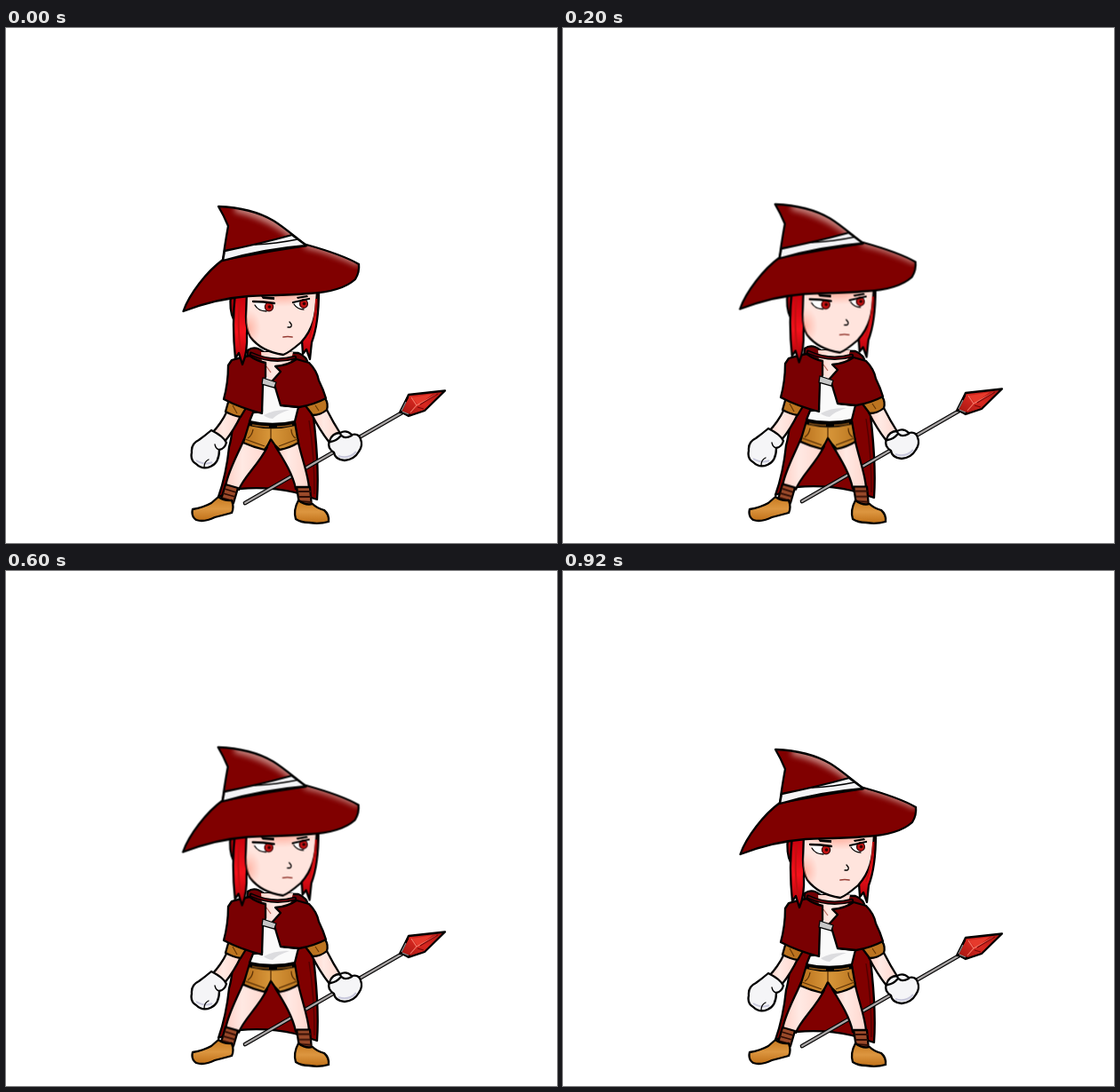
Recreate the animation shown at these times as an HTML page. Size 620x580 px, loop 1000 ms.

```html
<!DOCTYPE html>
<html lang="en">
<head>
<meta charset="utf-8">
<title>Red mage idle</title>
<style>
  html, body { margin: 0; width: 100%; height: 100%; overflow: hidden; background: #fff; }
  svg { display: block; width: 620px; height: 580px; }
  .ink { stroke: #000; stroke-width: 2.3; stroke-linejoin: round; stroke-linecap: round; }
  .line { fill: none; }
  .thin { stroke-width: 1.3; }
  .wide { stroke-width: 4.6; }
  .body, .legs, .head { animation: 1s step-end infinite; }
  .body { animation-name: breathe; }
  .legs { animation-name: stretch; transform-origin: 295px 542px; }
  .head { animation-name: nod; }
  @keyframes breathe {
    0%, 80% { transform: translateY(0); }
    20%, 60% { transform: translateY(-2px); }
    40% { transform: translateY(-4px); }
  }
  @keyframes stretch {
    0%, 80% { transform: scaleY(1); }
    20%, 60% { transform: scaleY(1.016); }
    40% { transform: scaleY(1.032); }
  }
  @keyframes nod {
    0%, 40%, 80% { transform: translateY(0); }
    20%, 60% { transform: translate(-.4px, -2.5px); }
  }
</style>
</head>
<body>
<svg viewBox="0 0 620 580" role="img" aria-label="Mage in a red hat holding a gem staff">
  <defs>
    <linearGradient id="skin" x1="0" x2="1">
      <stop offset="0" stop-color="#ffd0c6"/>
      <stop offset=".4" stop-color="#ffe9e3"/>
      <stop offset="1" stop-color="#ffd6cd"/>
    </linearGradient>
    <linearGradient id="hair" x1="0" y1="0" x2="0" y2="1">
      <stop offset="0" stop-color="#c4000c"/>
      <stop offset=".55" stop-color="#f5121c"/>
      <stop offset="1" stop-color="#a80008"/>
    </linearGradient>
    <linearGradient id="cloth" x1="0" x2="1">
      <stop offset="0" stop-color="#b8701c"/>
      <stop offset=".5" stop-color="#d8973a"/>
      <stop offset="1" stop-color="#bc7822"/>
    </linearGradient>
    <linearGradient id="shoe" x1="0" y1="0" x2="0" y2="1">
      <stop offset="0" stop-color="#c87a20"/>
      <stop offset=".5" stop-color="#dc9640"/>
      <stop offset="1" stop-color="#c07018"/>
    </linearGradient>
    <linearGradient id="gem" x1="0" y1="1" x2="1" y2="0">
      <stop offset="0" stop-color="#a01410"/>
      <stop offset=".5" stop-color="#d82820"/>
      <stop offset="1" stop-color="#a81410"/>
    </linearGradient>
    <radialGradient id="blush">
      <stop offset="0" stop-color="#ff8f78" stop-opacity=".75"/>
      <stop offset="1" stop-color="#ff9f8c" stop-opacity="0"/>
    </radialGradient>
    <filter id="soft" x="-30%" y="-30%" width="160%" height="160%"><feGaussianBlur stdDeviation="3"/></filter>
    <path id="crown" d="M239 201 C265 202 284 207 301 217 C314 225 326 236 338 245 L300 251 L244 261 L246 247 Q248 234 250 223 Q245 211 239 201Z"/>
    <path id="brim" d="M244 261 C268 256 300 247 338 244 C356 249 380 256 397 266 Q398 275 393 283 C381 294 362 298 340 299 C318 301 294 301 273 302 C246 304 220 311 199.5 319 C206 300 226 274 244 261Z"/>
    <path id="face" d="M271 296 L270 325 Q270 339 275 348 C284 360 298 366 312 368 Q318 366 332 354 C345 340 349 325 350 296Z"/>
    <clipPath id="crownClip"><use href="#crown"/></clipPath>
    <clipPath id="brimClip"><use href="#brim"/></clipPath>
    <clipPath id="faceClip"><use href="#face"/></clipPath>
  </defs>

  <g class="body">
    <path class="ink" fill="#800000" d="M256 422 Q256 455 251 472 Q248 502 239 528 L262 519 Q296 516 325 523 L350 531 Q353 490 344 422Z"/>
    <path class="line" stroke="#520000" stroke-width="1.4" d="M341 442 Q347 480 347 525"/>
    <!-- staff -->
    <path class="ink line wide" d="M269 535 L446 433"/>
    <path class="line" stroke="#a9a5a5" stroke-width="2.3" stroke-linecap="round" d="M269 535 L446 433"/>
    <path class="ink" fill="url(#gem)" d="M444 432 L453 413 L494 408.5 L471 431 L453 437Z"/>
    <path fill="#e63a2c" d="M457 416 L480 412 L464 425Z"/>
    <path class="line" stroke="#f47a68" stroke-width="1.1" d="M456 416 L462 425 L484 413 M462 425 L455 433"/>
    <path class="line" stroke="#7c0808" stroke-width="1.2" d="M463 427 L470 429 M466 424 L486 412"/>
    <path class="ink line" d="M443 433 L452 416 M444 433 L455 436"/>
    <path class="line" stroke="#888" stroke-width="1.3" d="M445 431 L450 421 M446 432 L453 435"/>
  </g>

  <g class="legs">
    <path class="ink" fill="url(#skin)" d="M268 463 C260 482 250 499 247 516 L262 520 C267 506 284 492 294 472Z"/>
    <path class="ink" fill="url(#skin)" d="M303 471 C313 487 323 503 326 519 L341 518 C340 502 333 486 328 463Z"/>
    <path class="ink" fill="#9a4a2a" d="M247 514 L261 518 L256 535 L242 531Z"/>
    <path class="ink" fill="#9a4a2a" d="M327 517 L342 517 L344 539 L330 536Z"/>
    <path class="line" stroke="#2e0c04" stroke-width="1.8" d="M246 519 L259 523 M244 524 L258 528 M243 529 L257 533 M328 522 L343 522 M329 528 L343 528 M330 533 L344 534"/>
    <path class="ink" fill="url(#cloth)" d="M274 444 Q299 449 325 444 L329 467 Q319 473 308 475 Q302 470 298 463 Q295 470 291 475 Q278 472 267 467Z"/>
    <path class="ink line wide" d="M275 446 Q300 452 324 446"/>
    <path class="line" stroke="#8a541a" stroke-width="1.5" d="M277 447 Q288 449 296 449 M305 449 Q314 449 322 447"/>
    <path class="line" stroke="#5c3206" stroke-width="1.3" d="M298 451 L298 463 M278 452 Q277 459 272 462 M321 452 Q321 459 326 462 M269 463 L291 471 M307 471 L328 463"/>
  </g>

  <g class="ink" fill="url(#shoe)">
    <path d="M239 528 Q246 533 254 532 Q257 540 254 546 Q243 549 235 551 Q223 557 214 554 Q208 550 210 542 Q222 540 231 535Z"/>
    <path d="M329 532 Q337 538 345 536 Q350 541 358 543 Q364 548 363 556 Q352 559 341 557 Q332 557 326 553 Q323 543 329 532Z"/>
  </g>

  <g class="body">
    <path class="ink" fill="url(#skin)" d="M249 431 Q242 446 231 457 L246 466 Q257 452 264 437Z"/>
    <path class="ink" fill="url(#skin)" d="M344 435 Q353 453 364 467 L377 458 Q368 444 361 430Z"/>
    <path class="ink" fill="#fafafa" d="M287 399 L304 403 L312 425 L329 427 L325 443 Q300 449 274 443 L278 433 L288 432Z"/>
    <path fill="#dcdcdf" d="M290 436 Q302 429 319 430 Q306 434 300 440 Q293 439 290 436Z"/>
    <path class="ink" fill="#bc7420" d="M251 418 L270 428 L264 438 Q256 437 247 432Z"/>
    <path class="ink" fill="#bc7420" d="M336 424 L359 417 Q363 423 361 430 Q354 436 345 436Z"/>
    <path class="line" stroke="#683806" stroke-width="1.2" d="M255 425 L260 434 M348 425 L352 431"/>

    <path class="ink" fill="#700004" d="M272 363 Q280 357 290 365 L329 366 Q339 370 340 379 L286 381 L271 374Z"/>
    <path fill="url(#skin)" d="M287 365 L323 365 L320 377 L308 387 L299 399 L289 389Z"/>
    <path class="line" stroke="#b86a5e" stroke-width="1.2" d="M293 381 L298 388"/>
    <path class="ink" fill="#790002" d="M254 374 Q264 371 274 369 Q282 375 292 377 L292 393 L289 402 L288 434 Q264 428 245 418 Q250 400 250 380Z"/>
    <path class="ink" fill="#790002" d="M327 373 L341 377 Q350 386 352 397 Q357 407 360 417 Q347 424 330 427 L309 425 L303 405 L300 397 L309 387 L303 381 Q317 380 327 373Z"/>
    <path class="ink thin" fill="#c7c7c7" d="M289 394 L304 399 L302 405 L288 401Z"/>
    <path class="ink line wide" d="M276 367 Q300 378 325 371"/>
    <path class="line" stroke="#640008" stroke-width="1.6" d="M276 367 Q300 378 325 371"/>

    <path class="ink" fill="#f5f5f7" d="M231 453 Q224 459 217 464 Q208 468 209 478 Q207 487 214 491 Q221 498 230 494 Q240 490 240 475 Q246 474 248 467 Q245 460 231 453Z"/>
    <path class="line" stroke="#c8c8dc" stroke-width="2" d="M214 487 Q224 493 232 489"/>
    <path class="ink line thin" d="M240 475 Q236 474 235 469 M223 495 Q223 488 228 486"/>
    <path class="ink" fill="#f5f5f7" d="M364 465 Q367 456 376 456 Q383 452 389 458 Q397 456 399 463 Q402 470 397 477 Q392 486 381 487 Q370 486 369 478 Q361 473 364 465Z"/>
    <path class="line" stroke="#c8c8dc" stroke-width="2" d="M374 482 Q386 486 394 477"/>
    <path class="ink line" d="M376 457 Q380 464 389 459 M365 466 Q372 465 376 460"/>
  </g>

  <g class="head">
    <path class="ink" fill="#a50008" d="M253 300 Q251 318 256 328 L260 300Z"/>
    <path class="ink" fill="url(#hair)" d="M258 298 Q254 333 258 372 L262 366 L266 379 Q272 365 271 344 L274 298Z"/>
    <path class="ink" fill="url(#hair)" d="M344 296 L352 296 Q352 333 344 354 L342 373 L338 362 L334 367 L333 352 Q346 337 344 296Z"/>
    <use href="#face" class="ink" fill="#ffe4dd"/>
    <g clip-path="url(#faceClip)">
      <ellipse cx="310" cy="299" rx="42" ry="15" fill="url(#blush)"/>
      <ellipse cx="273" cy="338" rx="14" ry="21" fill="url(#blush)" opacity=".75"/>
    </g>
    <path class="line" stroke="#c01010" stroke-width="2" d="M263 308 Q260 336 264 364 M349 305 Q349 326 341 350"/>

    <path fill="#fff" d="M279 310 Q290 306 302 310 Q300 318 292 319 Q284 319 279 310Z"/>
    <path fill="#fff" d="M323 308 Q332 305 341 306 Q341 315 335 317 Q326 316 323 308Z"/>
    <g fill="#c31212" stroke="#300" stroke-width="1.3">
      <ellipse cx="296" cy="314" rx="4.6" ry="4.8"/>
      <ellipse cx="335" cy="310.5" rx="4.4" ry="4.8"/>
    </g>
    <g fill="#300"><circle cx="296.5" cy="314" r="1.8"/><circle cx="335.5" cy="310.5" r="1.8"/></g>
    <path class="ink line" d="M278 308 Q290 308 302 310 M323 309 Q332 307 341 305"/>
    <path class="ink line thin" d="M280 312 Q284 319 293 319 M324 311 Q328 317 335 317"/>
    <path d="M287 302 L302 303 L302 306 L289 305Z M327 303 L339 301 L340 303 L328 305Z"/>
    <path class="ink line thin" d="M319 331 Q323 335 320 337 L317 337"/>
    <path class="line" stroke="#963c34" stroke-width="1.7" stroke-linecap="round" d="M312 348 Q317 347 322 348"/>

    <use href="#brim" fill="#800000"/>
    <g clip-path="url(#brimClip)">
      <path class="line" stroke="#d9a9a2" stroke-width="8" opacity=".7" filter="url(#soft)" d="M336 244 Q365 250 398 265"/>
    </g>
    <use href="#brim" class="ink line"/>
    <use href="#crown" fill="#800000"/>
    <g clip-path="url(#crownClip)">
      <path class="line" stroke="#d9a9a2" stroke-width="11" opacity=".75" filter="url(#soft)" d="M258 202 Q301 211 337 243"/>
    </g>
    <use href="#crown" class="ink line"/>
    <path class="ink" fill="#f4f4f6" d="M246 251 Q286 243 322 233 L338 245 Q290 249 244 262Z"/>
    <path class="ink line thin" d="M280 244 Q304 243 328 238"/>
  </g>
</svg>
</body>
</html>
```
